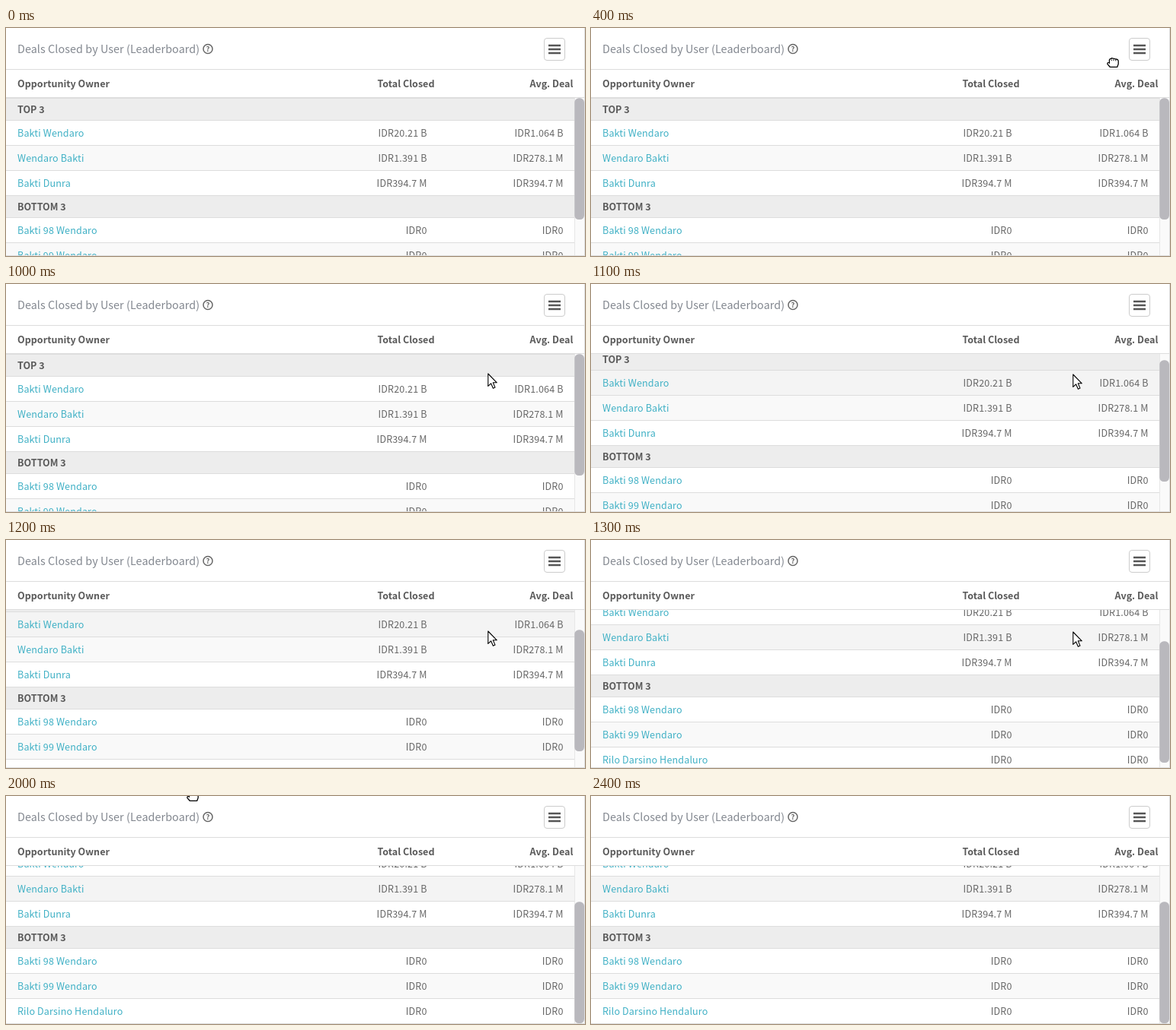
An HTML page that plays this animation: 760x300 px, repeating every 2500 ms.

```html
<!DOCTYPE html>
<html lang="en">
<head>
<meta charset="utf-8">
<title>Leaderboard</title>
<style>
  html, body { margin: 0; width: 100%; height: 100%; overflow: hidden; background: #fff; }
  svg { display: block; width: 760px; height: 300px; }
  text {
    font: 12.55px "Noto Sans CJK JP", "Noto Sans CJK SC", "Noto Sans CJK", "Noto Sans", sans-serif;
    letter-spacing: .14px;
    fill: #666;
  }
  .bold { font-weight: 700; letter-spacing: 0; fill: #5a5a5a; }
  .end { text-anchor: end; }
  .title { font-size: 14.35px; letter-spacing: .07px; fill: #82878f; }
  .mark { font-size: 9.5px; font-weight: 700; letter-spacing: 0; text-anchor: middle; }
  .link { fill: #3fb0c5; }
  .line { fill: #ddd; }
  .cursor { fill: #fff; stroke: #000; stroke-linejoin: round; }
</style>
</head>
<body>
<svg viewBox="0 0 760 300">
  <defs><clipPath id="view"><rect y="92" width="746" height="207"/></clipPath></defs>
  <rect width="760" height="300" fill="#fff"/>

  <text class="title" x="15" y="33">Deals Closed by User (Leaderboard)</text>
  <circle cx="265" cy="27.5" r="6" fill="none" stroke="#666" stroke-width="1.5"/>
  <text class="mark" x="265" y="31">?</text>
  <rect x="706.5" y="13.5" width="27" height="29" rx="3.5" fill="#fff" stroke="#ccc"/>
  <path d="M712 23h16M712 28h16M712 33h16" stroke="#555" stroke-width="2.7"/>

  <rect class="line" y="54" width="760" height="1"/>
  <text class="bold" x="15" y="78">Opportunity Owner</text>
  <text class="bold end" x="562.5" y="78">Total Closed</text>
  <text class="bold end" x="744.5" y="78">Avg. Deal</text>
  <rect class="line" y="91" width="760" height="1"/>

  <g clip-path="url(#view)"><g id="list"></g></g>

  <rect x="746" y="92" width="13" height="207" fill="#fafafa"/>
  <rect x="746" y="92" width="1" height="207" fill="#e7e7e7"/>
  <rect id="thumb" x="746.3" y="92.3" width="12.7" height="159.7" rx="5.5" fill="#b9b8bd"/>
  <rect class="line" x="759" width="1" height="300"/>
  <rect class="line" y="299" width="760" height="1"/>

  <path id="arrow" class="cursor" visibility="hidden" stroke-width="1.1"
    d="M.8 1V17.4L4.6 13.8 7.4 20.2 10 19.1 7.3 12.8H12.3Z"/>
  <g id="fist" class="cursor" visibility="hidden" stroke-width="1.3">
    <path d="M3.4 6.4V3.2Q3.6 1.4 5.2 1.7Q5.8 .6 7.4 .8Q8.5 .7 9 1.5Q10.6 .9 11.6 2.1
      Q14.6 1.6 15.2 4.2V8.4L13.8 12.3H4.2L1 8.6Q.4 6.2 3.4 6.4Z"/>
    <path d="M6.2 2.6V4.2M9 2.4V4.2M11.8 2.8V4.4M3.4 6.4V8" stroke-width="1"/>
  </g>
</svg>
<script>
(() => {
  const $ = id => document.getElementById(id);
  const list = $('list');

  function add(tag, attrs, label = '') {
    const el = document.createElementNS('http://www.w3.org/2000/svg', tag);
    for (const key in attrs) el.setAttribute(key, attrs[key]);
    el.textContent = label;
    return list.appendChild(el);
  }

  const rows = [
    ['TOP 3'],
    ['Bakti Wendaro', 'IDR20.21 B', 'IDR1.064 B'],
    ['Wendaro Bakti', 'IDR1.391 B', 'IDR278.1 M'],
    ['Bakti Dunra', 'IDR394.7 M', 'IDR394.7 M'],
    ['BOTTOM 3'],
    ['Bakti 98 Wendaro', 'IDR0', 'IDR0'],
    ['Bakti 99 Wendaro', 'IDR0', 'IDR0'],
    ['Rilo Darsino Hendaluro', 'IDR0', 'IDR0']
  ];

  add('rect', { class: 'line', y: 92, width: 746, height: 1 });
  let rowY = 93, stripe = 0;
  const owners = [];
  for (const [name, total, avg] of rows) {
    const group = !total, height = group ? 29 : 33;
    stripe = group ? 0 : stripe + 1;
    const color = group ? '#ededed' : stripe % 2 ? '#fff' : '#f9f9f9';
    const bg = add('rect', { y: rowY, width: 746, height, fill: color });
    add('rect', { class: 'line', y: rowY + height - 1, width: 746, height: 1 });
    add('text', { class: group ? 'bold' : 'link', x: 15, y: rowY + (group ? 19 : 21) }, name);
    if (!group) {
      add('text', { class: 'end', x: 552.6, y: rowY + 21 }, total);
      add('text', { class: 'end', x: 731.6, y: rowY + 21 }, avg);
      owners.push({ bg, color });
    }
    rowY += height;
  }

  const TICK = 100, LOOP = 2500, MAX_SCROLL = 49;

  // Pointer path: tick, x, y, shape
  const path = [
    [0], [1, 723, 3, 'fist'], [2, 708, 15, 'fist'], [3, 692, 27, 'fist'], [4, 677, 39, 'fist'],
    [5, 668, 56, 'arrow'], [6, 656, 70, 'arrow'], [7, 648, 85, 'arrow'], [8, 640, 99, 'arrow'],
    [9, 634, 111, 'arrow'], [10, 632, 117, 'arrow'], [11, 632, 118, 'arrow'],
    [12, 632, 119, 'arrow'], [13, 632, 120, 'arrow'], [14, 632, 121, 'arrow'],
    [17, 590, 101, 'arrow'], [18, 486, 62, 'arrow'], [19, 356, 20, 'fist'],
    [20, 237, -6, 'fist'], [21, 124, -9, 'fist'], [22, 56, -10, 'fist'],
    [23, 83, -10, 'fist'], [24]
  ];
  const scrolls = [0, 8, 27, 43, MAX_SCROLL];

  function draw(now) {
    const tick = Math.floor(now % LOOP / TICK);
    const offset = scrolls[Math.min(Math.max(tick - 10, 0), 4)];
    list.setAttribute('transform', `translate(0 ${-offset})`);
    $('thumb').setAttribute('transform', `translate(0 ${Math.round(offset * 47 / MAX_SCROLL)})`);

    const hovered = tick < 11 ? -1 : tick < 13 ? 0 : 1;
    owners.forEach(({ bg, color }, i) => bg.setAttribute('fill', i === hovered ? '#f4f4f4' : color));

    const [, x, y, shape] = path.filter(p => p[0] <= tick).pop();
    for (const id of ['arrow', 'fist']) {
      $(id).setAttribute('visibility', id === shape ? 'visible' : 'hidden');
      if (id === shape) $(id).setAttribute('transform', `translate(${x} ${y})`);
    }
  }

  const start = performance.now();
  (function loop() {
    draw(performance.now() - start);
    requestAnimationFrame(loop);
  })();
})();
</script>
</body>
</html>
```
